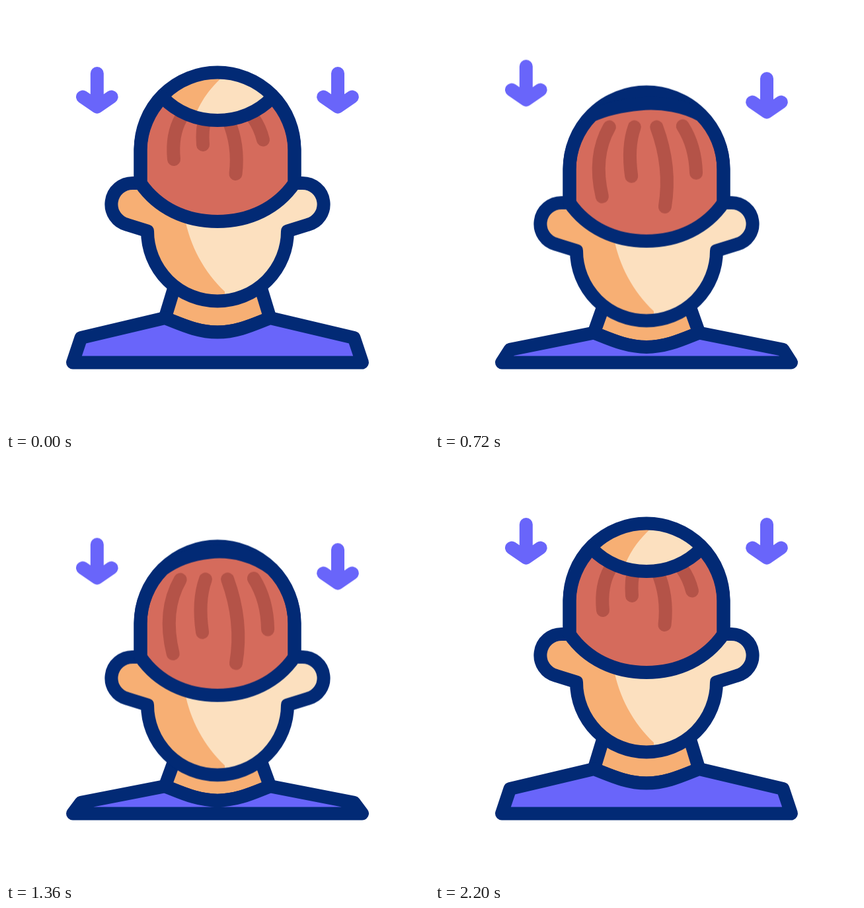
An HTML page that plays this animation: 640 px wide and 640 px high, repeating every 2.4 s.

```html
<!DOCTYPE html>
<html lang="en">
<head>
<meta charset="utf-8">
<title>Hair growth</title>
<style>
  :root {
    --navy: #022a75;
    --violet: #6965fa;
    --tan: #f7af74;
    --cream: #fce0bf;
    --red: #d56b5c;
    --lock: #b45348;
  }
  html, body { margin: 0; width: 100%; height: 100%; overflow: hidden; background: #fff; }
  svg { display: block; width: 100%; height: 100%; }

  .line { fill: none; stroke: var(--navy); }
  .line, .lock, .arrow { stroke-width: 20; stroke-linecap: round; stroke-linejoin: round; }
  .lock { fill: none; stroke: var(--lock); }
  .arrow { fill: none; stroke: var(--violet); animation: bob 2400ms infinite cubic-bezier(.333, 0, .667, 1); }
  .late { animation-delay: 80ms; }

  .head { animation: nod 2400ms infinite; }
  .morph { d: var(--a); animation: morph 2400ms infinite; }

  .shirt {
    --a: path('M101 539.4L113.5 502L240.5 472C266 482 290 493.5 320 493.5C350 493.5 374 482 399.5 472L526.5 502L539 539.4Z');
    --b: path('M101 539.4L113.5 525.5L240.5 501.5C266 511.5 290 523 320 523C350 523 374 511.5 399.5 501.5L526.5 525.5L539 539.4Z');
  }
  .neck {
    --a: path('M256 421L240.5 472C266 482 290 493.5 320 493.5C350 493.5 374 482 399.5 472L384 421');
    --b: path('M256 460L240.5 501.5C266 511.5 290 523 320 523C350 523 374 511.5 399.5 501.5L384 460');
  }
  .hair {
    --a: path('M237 138C258.5 161.3 289.2 173 320 173C350.8 173 381.5 161.3 403 138A116.5 116.5 0 0 1 436.5 217V268C410 306 368 326 320 326C272 326 230 306 203.5 268V217A116.5 116.5 0 0 1 237 138Z');
    --b: path('M237 135.2C255.5 116.5 279.8 104.5 306 101.3C341.8 97 377.7 109.5 403 135.2A116.5 116.5 0 0 1 436.5 217V268C410 306 368 326 320 326C272 326 230 306 203.5 268V217A116.5 116.5 0 0 1 237 135.2Z');
  }
  .lock1 {
    --a: path('M265 169C253 190 252 212 254 232');
    --b: path('M263.5 148.5C241 188 243 230 252.5 267');
  }
  .lock2 {
    --a: path('M301 172C297 184 297 197 298 210');
    --b: path('M302 147.5C292 175 293 207 297 233.5');
  }
  .lock3 {
    --a: path('M336 172C347 197 351 225 347.5 254');
    --b: path('M335 147.5C351 192 356 235 348 280.5');
  }
  .lock4 {
    --a: path('M374 169C381 179 386 190 389 202.5');
    --b: path('M375 146.5C391 172 397 200 397 229.5');
  }

  @keyframes morph {
    0% { d: var(--a); animation-timing-function: cubic-bezier(.333, 0, .667, 1); }
    44.04% { d: var(--b); animation-timing-function: cubic-bezier(.74, 0, .2, 1); }
    83.5%, 100% { d: var(--a); }
  }
  @keyframes nod {
    0% { transform: translateY(0); animation-timing-function: cubic-bezier(.333, 0, .667, 1); }
    44.04% { transform: translateY(39px); animation-timing-function: cubic-bezier(.74, 0, .2, 1); }
    83.5%, 100% { transform: translateY(0); }
  }
  @keyframes bob {
    0%, 88.89%, 100% { transform: translateY(0); }
    18.4%, 52.8% { transform: translateY(38.5px); }
    36.11%, 70.83% { transform: translateY(-29px); }
  }
</style>
</head>
<body>
<svg viewBox="0 0 640 640">
  <defs>
    <path id="face" d="M203.5 268H192A32 32 0 0 0 183.5 331L214 340.5A106 106 0 0 0 426 340.5L456.5 331A32 32 0 0 0 448 268H436.5"/>
    <path id="scalp" d="M203.5 268V217A116.5 116.5 0 0 1 436.5 217V268"/>
    <clipPath id="skin"><use href="#face"/><use href="#scalp"/></clipPath>
  </defs>

  <path class="arrow" d="M137.8 102V152.5M116 137.5L137.8 152.5L159.6 137.5"/>
  <path class="arrow late" d="M502 102V152.5M480.2 137.5L502 152.5L523.8 137.5"/>

  <path class="neck morph" fill="var(--tan)"/>
  <path class="neck morph line"/>
  <path class="shirt morph" fill="var(--violet)"/>
  <path class="shirt morph line"/>

  <g class="head">
    <g clip-path="url(#skin)">
      <rect x="140" y="90" width="360" height="360" fill="var(--tan)"/>
      <path fill="var(--cream)" d="M328 107C302 130 288 155 280 185C268 230 264 280 270 318C278 363 300 403 331 432V440H500V90H328Z"/>
    </g>
    <path class="hair morph" fill="var(--red)"/>
    <path class="lock lock1 morph"/>
    <path class="lock lock2 morph"/>
    <path class="lock lock3 morph"/>
    <path class="lock lock4 morph"/>
    <use class="line" href="#face"/>
    <use class="line" href="#scalp"/>
    <path class="hair morph line"/>
  </g>
</svg>
</body>
</html>
```
